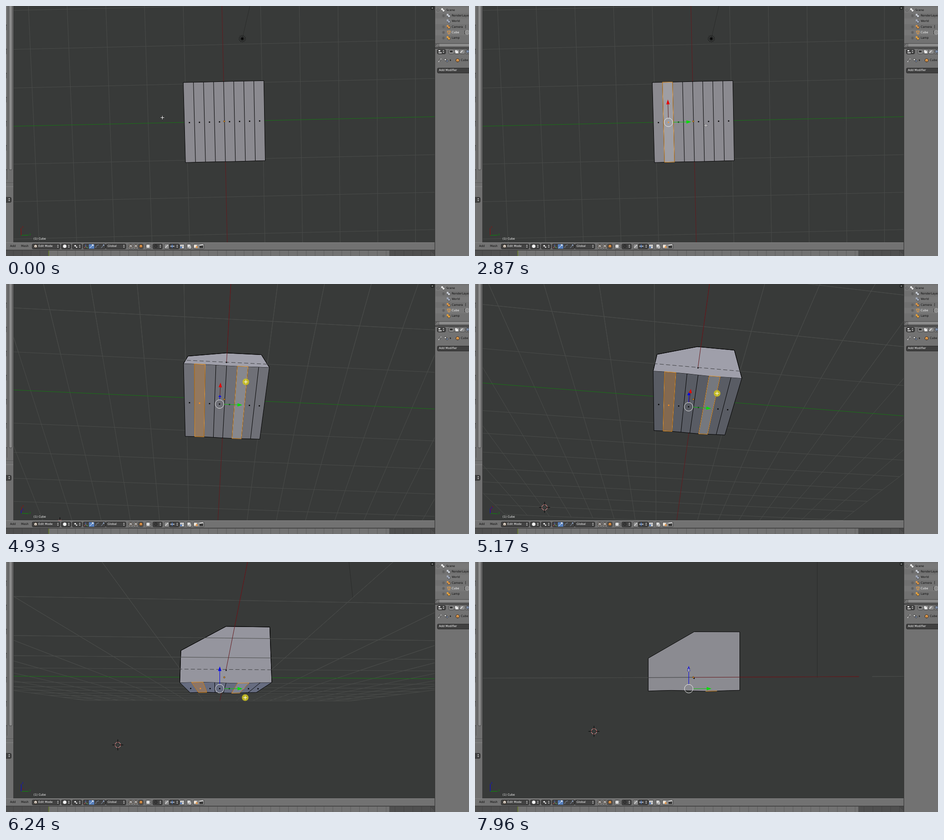
Animation, 1017 px wide and 550 px high, one loop 8 s. Source, as an HTML page with a canvas:

```html
<!DOCTYPE html>
<html lang="en">
<head>
<meta charset="utf-8">
<title>Box modelling viewport</title>
<style>
html, body { margin: 0; width: 100%; height: 100%; overflow: hidden; background: #727272; }
canvas { display: block; }
</style>
</head>
<body>
<canvas id="stage" width="1017" height="550"></canvas>
<script>
const ctx = document.getElementById('stage').getContext('2d');
const LOOP = 8000, STEP = 105, PHASE = 25;
const CX = 479.5, CY = 253.5, FOCAL = 506, DIST = 6.035, NEAR = 0.1;
const FONT = '6.3px "DejaVu Sans", sans-serif';
const ORANGE = '#f09a28', GRID = '#4a4c4a', RED = '#64191d', GREEN = '#187516';
const FIRST_PICK = 1290, SECOND_PICK = 3430, DRAG = 4540, RELEASE = 7530;

// time, x, y
const POINTER = [
  [0, 343, 245], [160, 383, 260], [640, 416, 270], [790, 419, 269], [1960, 420, 269],
  [2200, 426, 270], [2430, 450, 273], [2870, 508, 262], [3620, 509, 262], [3910, 512, 257],
  [4330, 522, 177], [7480, 506, 268], [7690, 506, 268], [7900, 469, 237]
];
// time, degrees below the floor, yaw
const ORBIT = [
  [4435, 88.45, -1.3], [5170, 48.8, 5.95], [5695, 20.8, 4], [6300, 8.5, 1.7],
  [6850, 3.65, 0.9], [7000, 1, 0.8], [7270, 0, 0.77]
];

const clamp = v => Math.min(1, Math.max(0, v));
const lerp = (a, b, u) => a + (b - a) * u;
const mix = (a, b, u) => `rgb(${a.map((v, i) => Math.round(lerp(v, b[i], clamp(u)))).join()})`;

function along(keys, t) {
  const i = Math.max(1, keys.findIndex(k => k[0] > t));
  if (t >= keys[keys.length - 1][0]) return keys[keys.length - 1].slice(1);
  const a = keys[i - 1], b = keys[i], u = clamp((t - a[0]) / (b[0] - a[0]));
  return [lerp(a[1], b[1], u), lerp(a[2], b[2], u)];
}

function line(x1, y1, x2, y2, color, width = 1) {
  ctx.strokeStyle = color;
  ctx.lineWidth = width;
  ctx.beginPath();
  ctx.moveTo(x1, y1);
  ctx.lineTo(x2, y2);
  ctx.stroke();
}
function rect(x, y, w, h, color) {
  ctx.fillStyle = color;
  ctx.fillRect(x, y, w, h);
}
function disc(x, y, r, fill, stroke, width = 1) {
  ctx.beginPath();
  ctx.arc(x, y, r, 0, Math.PI * 2);
  if (fill) { ctx.fillStyle = fill; ctx.fill(); }
  if (stroke) { ctx.strokeStyle = stroke; ctx.lineWidth = width; ctx.stroke(); }
}
function poly(points, fill, stroke) {
  ctx.beginPath();
  points.forEach(p => ctx.lineTo(p[0], p[1]));
  ctx.closePath();
  if (fill) { ctx.fillStyle = fill; ctx.fill(); }
  if (stroke) { ctx.strokeStyle = stroke; ctx.lineWidth = 1; ctx.stroke(); }
}
function dashed(pattern, paint) {
  ctx.setLineDash(pattern);
  paint();
  ctx.setLineDash([]);
}
function text(s, x, y, color = '#0a0a0a') {
  ctx.font = FONT;
  ctx.textBaseline = 'middle';
  ctx.fillStyle = color;
  ctx.fillText(s, x, y);
}
function button(x, y, w, h, fill = '#8b8b8b', border = '#454545') {
  ctx.beginPath();
  ctx.roundRect(x + 0.5, y + 0.5, w, h, 2.5);
  ctx.fillStyle = fill;
  ctx.fill();
  ctx.strokeStyle = border;
  ctx.lineWidth = 1;
  ctx.stroke();
}

const checker = (() => {
  const c = document.createElement('canvas');
  c.width = c.height = 2;
  const g = c.getContext('2d');
  g.fillStyle = 'rgba(255,255,255,.35)';
  g.fillRect(0, 0, 1, 1);
  g.fillRect(1, 1, 1, 1);
  return ctx.createPattern(c, 'repeat');
})();

// --- camera ---
let sinE, cosE, sinA, cosA;

function aim(e, a) {
  e *= Math.PI / 180;
  a *= Math.PI / 180;
  sinE = Math.sin(e); cosE = Math.cos(e);
  sinA = Math.sin(a); cosA = Math.cos(a);
}
function toView([x, y, z]) {
  const f = x * cosA - y * sinA;
  return [y * cosA + x * sinA, f * sinE + z * cosE, DIST - f * cosE + z * sinE];
}
const toScreen = ([r, u, d]) => [CX + FOCAL * r / d, CY - FOCAL * u / d, d];
const project = (x, y, z) => toScreen(toView([x, y, z]));

function line3(p, q, color) {
  let a = toView(p), b = toView(q);
  if (a[2] < b[2]) [a, b] = [b, a];
  if (a[2] < NEAR) return;
  if (b[2] < NEAR) {
    const u = (a[2] - NEAR) / (a[2] - b[2]);
    b = a.map((v, i) => lerp(v, b[i], u));
  }
  a = toScreen(a);
  b = toScreen(b);
  line(a[0], a[1], b[0], b[1], color);
}

// --- scene ---
function drawFloor(from) {
  for (let i = -8; i <= 8; i++) {
    if (!i) continue;
    line3([from, i, 0], [8, i, 0], GRID);
    if (i > from || from < 0) line3([i, -8, 0], [i, 8, 0], GRID);
  }
  if (from < 0) line3([0, -8, 0], [0, 8, 0], GREEN);
  else dashed([9, 5], () => line3([1, -1, 0], [1, 1, 0], '#3c3d40'));
  line3([from, 0, 0], [8, 0, 0], RED);
}

// the floor seen exactly edge-on
function drawHorizon() {
  line(17, 255, 380, 253.8, GRID);
  line(380, 253.8, 478, 253.2, '#3a3b3c');
  line(478, 253.3, 843, 251.6, RED);
  line(872, 251.4, 942, 251, GRID);
}

function drawLamp() {
  const lamp = [4.076, 1.005, 5.904];
  line3(lamp, [lamp[0], lamp[1], 0], '#2b2c2b');
  const [x, y, d] = project(...lamp);
  if (d < NEAR) return;
  disc(x, y, 2.6, '#000');
  disc(x, y, 4.2, null, '#111', 0.8);
  dashed([1.4, 2], () => disc(x, y, 7, null, '#0a0a0a', 1.2));
}

const stripY = i => -1 + i / 4;
const baseZ = i => -0.292 + 0.01 * Math.cos((i - 2) * Math.PI / 3);
const baseTone = e => e < 49
  ? mix([106, 112, 135], [89, 92, 100], e / 49)
  : mix([89, 92, 100], [139, 138, 144], (e - 49) / 39);

function drawBox(e, picked) {
  const ids = [...Array(9).keys()];
  const edge = x => ids.map(i => project(x, stripY(i), baseZ(i)));
  const near = edge(1), far = edge(-1);
  const quad = i => [near[i], near[i + 1], far[i + 1], far[i]];
  const active = picked[picked.length - 1];
  const baseShown = e > 2.8;

  if (baseShown) {
    poly([...near, ...far.slice().reverse()], baseTone(e), '#000');
    for (let i = 1; i < 8; i++) line(...near[i].slice(0, 2), ...far[i].slice(0, 2), '#000');
    picked.forEach(i => poly(quad(i), i === active ? checker : 'rgba(255,143,21,.25)'));
  }
  if (e < 80) {
    const top = [[1, 1], [0, 1], [-1, 0.42]].map(([y, z]) => project(1, y, z));
    poly([...near, ...top], mix([139, 139, 145], [159, 159, 170], e / 20));
    poly(baseShown ? [near[8], ...top, near[0], ...top.reverse()] : [...near, ...top], null, '#000');
    if (e > 0.3) drawFloor(1); else drawHorizon();
    const [x, y] = project(1, 0, -0.02);
    rect(x - 1.2, y - 1.2, 2.4, 2.4, '#000');
  }
  if (baseShown) {
    picked.forEach(i => poly(quad(i), null, ORANGE));
    for (let i = 0; i < 8 && e > 6; i++) {
      const [x, y] = project(0, stripY(i + 0.5), -0.295);
      rect(x - 1.3, y - 1.3, 2.6, 2.6, picked.includes(i) ? '#ff9320' : '#000');
    }
  } else if (picked.length) {
    line(...near[active].slice(0, 2), ...near[active + 1].slice(0, 2), ORANGE);
  }
  disc(CX - 0.5, CY - 0.3, 1.7, ORANGE, '#3a2a10', 0.8);
}

function drawGizmo(picked) {
  if (!picked.length) return;
  const mid = picked.reduce((s, i) => s + stripY(i + 0.5), 0) / picked.length;
  const p = [0, mid, -0.295], [x, y, d] = project(...p);
  const size = 50 * d / FOCAL;
  [['#e80000', '#5a1c1c'], ['#00e000', '#0fc40f'], ['#0000ee', '#0000ee']].forEach(([head, shaft], axis) => {
    const at = k => project(...p.map((v, i) => v + (i === axis ? size * k : 0)));
    const tip = at(1), neck = at(0.79);
    const dx = tip[0] - x, dy = tip[1] - y, len = Math.hypot(dx, dy);
    if (len < 8) return;
    const ux = dx / len, uy = dy / len, w = 3.6;
    if (len > 11) line(x + ux * 10, y + uy * 10, neck[0], neck[1], shaft);
    poly([tip, [neck[0] - uy * w, neck[1] + ux * w], [neck[0] + uy * w, neck[1] - ux * w]], head);
  });
  disc(x, y, 9.4, null, '#f0f0f0');
}

function drawAnchor() {
  const [x, y, d] = project(-2.324, -3.56, -1.948);
  if (d < NEAR) return;
  disc(x, y, 6, null, '#eee');
  dashed([2.4, 2.4], () => disc(x, y, 6, null, '#d02020'));
  for (const s of [-1, 1]) {
    line(x + s * 4, y, x + s * 12, y, '#000');
    line(x, y + s * 4, x, y + s * 12, '#000');
  }
}

function drawAxes() {
  const ox = 33, oy = 504, len = 16;
  ['#8c1212', '#0c8a0c', '#0a0ad8'].forEach((color, axis) => {
    const [r, u] = toView([0, 1, 2].map(i => +(i === axis)));
    if (Math.hypot(r, u) < 0.12) return;
    const x = ox + r * len, y = oy - u * len;
    line(ox, oy, x, y, color, 1.2);
    text('xyz'[axis], x + 1.5, y - 2, color);
  });
}

function drawPointer(x, y, pressed) {
  if (pressed) disc(x, y, 7.3, 'rgba(205,195,30,.88)');
  const cross = (color, width, r) => {
    line(x - r, y, x + r, y, color, width);
    line(x, y - r, x, y + r, color, width);
  };
  if (!pressed) cross('rgba(0,0,0,.45)', 2.6, 4.4);
  cross('#fff', 1.1, 4);
}

// --- interface ---
function arrows(x, y) {
  for (const s of [-1, 1]) poly([[x - 1.6, y + s], [x, y + s * 3.4], [x + 1.6, y + s]], '#ddd');
}
function dropdown(x, y, w, h = 11) {
  button(x, y - h / 2, w, h, '#424242', '#2a2a2a');
  arrows(x + w - 4, y);
}
function cube(x, y, color) {
  const hex = [...Array(6).keys()].map(i => [x + 4 * Math.sin(i * Math.PI / 3), y - 4 * Math.cos(i * Math.PI / 3)]);
  poly(hex, color, '#33261a');
  line(x, y, x, y + 3.5, '#33261a', 0.7);
}
function grip(x, y) {
  for (let i = 0; i < 3; i++) line(x + i * 3, y, x + 9, y + 9 - i * 3, '#333', 0.8);
}

function drawLeft() {
  rect(0, 0, 17, 520, '#707070');
  button(6, -8, 7, 368, '#8b8b8b', '#484848');
  for (let y = 0; y < 370; y += 53) {
    rect(0, y, 1.5, 42, '#8b8b8b');
    line(0, y + 42, 2, y + 42, '#333');
  }
  line(2.5, 0, 2.5, 382, '#555');
  line(0, 388.5, 16, 388.5, '#5a5a5a');
  line(0, 397.5, 16, 397.5, '#858585');
  dropdown(-4, 426, 15);
  line(16.5, 0, 16.5, 520, '#3a3a3a');
}

function drawHeader() {
  const y = 528.5, top = 523, h = 11;
  rect(0, 520, 942, 17, '#727272');
  line(0, 520.5, 942, 520.5, '#858585');
  text('Add', 9, y);
  text('Mesh', 33, y);

  dropdown(57, y, 61);
  cube(65, y, '#d8d0c8');
  text('Edit Mode', 71, y, '#fff');
  dropdown(121, y, 21);
  disc(129, y, 3.8, '#f2f2f2');
  dropdown(145, y, 21);
  disc(152, y - 1, 2.6, '#ddd', '#222');
  disc(155, y + 2, 1.6, '#ddd');

  button(169, top, 49, h, '#424242', '#2a2a2a');
  line(175, y + 1, 175, y - 4, '#5a7be0');
  line(175, y + 1, 171, y + 4, '#d05050');
  line(175, y + 1, 180, y + 4, '#60c060');
  rect(182, top + 1, 12, h - 1, '#5780bd');
  line(184, y + 4, 191, y - 3, '#fff');
  poly([[192, y - 4], [192, y], [188, y - 4]], '#fff');
  ctx.beginPath();
  ctx.arc(204, y + 4, 7, Math.PI, Math.PI * 1.5);
  ctx.strokeStyle = '#8a9cb8';
  ctx.stroke();
  line(209, y + 4, 215, y - 3, '#8a9cb8');
  rect(213, y - 4, 3, 3, '#8a9cb8');
  dropdown(219, y, 44);
  text('Global', 223, y, '#fff');

  for (let i = 0; i < 3; i++) {
    button(268 + i * 11, top, 11, h, i < 2 ? '#8b8b8b' : '#555');
    cube(274 + i * 11.2, y, i < 2 ? '#aaa' : '#e0954a');
  }
  button(306, top, 12, h);
  dashed([1.5, 1.5], () => disc(312, y, 4, '#ddd', '#111'));
  dropdown(322, y, 21);
  disc(329, y, 3.2, '#3a3a3a', '#222');
  button(347, top, 11, h);
  line(350, y + 3, 356, y - 3, '#ccc', 2);
  dropdown(358, y, 22);
  line(361, y, 370, y, '#e8f0ff', 1.4);
  line(365, y - 4, 365, y + 4, '#4a80d8', 1.4);
  button(381, top, 11, h);
  for (let i = 0; i < 4; i++) rect(383 + i % 2 * 4, y - 3 + (i >> 1) * 4, 3, 3, i === 2 ? '#4a80d8' : '#e8e8e8');
  button(396, top, 11, h);
  rect(399, y - 3.5, 5, 5, '#ddd');
  disc(404, y + 2, 2.4, '#999', '#eee');
  button(411, top, 24, h);
  rect(413, y - 3, 6, 6, '#efe6da');
  disc(419, y + 2, 2.2, '#e0954a');
  rect(425, y - 1, 8, 5, '#333');
  line(425, y - 2, 433, y - 4, '#eee', 1.5);
}

function drawTimeline() {
  rect(0, 537, 942, 13, '#4f4f4f');
  rect(94, 538, 748, 12, '#727272');
  for (let x = 16; x < 942; x += 19.5) line(x, 538, x, 550, 'rgba(40,40,40,.28)');
  line(0, 537, 942, 537, '#2e2e2e');
  line(94, 538, 94, 550, '#6f8a2a', 1.4);
  grip(932, 537);
}

function drawOutliner() {
  const icons = ['#e8e8e8', '#c8ccd4', '#a0a8b8', '#d8954a', '#e89a3c', '#e0a040'];
  ['Scene', 'RenderLayers', 'World', 'Camera', 'Cube', 'Lamp'].forEach((name, i) => {
    const y = 9 + i * 12.3, x = i ? 979 : 967, knob = x - 18, lit = name === 'Cube';
    if (i % 2 === 0) rect(943, y - 6, 74, 12.3, '#787878');
    if (name !== 'World') {
      disc(knob, y, 2.3, '#b4b4b4', '#333', 0.8);
      line(knob - 1.4, y, knob + 1.4, y, '#111', 0.8);
      if (i) line(knob, y - 1.4, knob, y + 1.4, '#111', 0.8);
    }
    if (lit) {
      disc(x - 6, y, 5, '#8a8178');
      poly([[x - 10, y - 3], [x - 3, y - 3], [x - 6, y + 4]], null, icons[i]);
    } else {
      disc(x - 6, y + 1, 3, icons[i], '#333', 0.8);
      rect(x - 11, y - 4, 4, 4, icons[i]);
    }
    text(name, x, y, lit ? '#fff' : '#0a0a0a');
  });
  line(1009.5, 42, 1009.5, 49, '#333');
  line(1007.5, 54, 1007.5, 62, '#333');
  disc(1013, 58, 4.5, '#8c8c8c', '#aaa');
}

function drawRight() {
  rect(942, 0, 75, 550, '#727272');
  drawOutliner();
  button(944, 82, 90, 7, '#8c8c8c', '#484848');
  grip(943, 82);
  line(942, 92.5, 1017, 92.5, '#2e2e2e', 2);
  dropdown(947, 100, 18, 10);
  rect(950, 97, 4, 3, '#ddd');
  rect(950, 102, 7, 2, '#ddd');
  for (let x = 972; x < 1017; x += 12) button(x, 95, 12, 10);
  rect(975, 98, 6, 4, '#333');
  rect(986, 97, 5, 5, '#ccc');
  rect(988, 99, 5, 5, '#eee');
  line(998, 103, 1003, 98, '#eee', 1.6);
  disc(1014, 100, 3.5, '#7d8ca5', '#333');

  line(950, 123, 956, 116, '#ddd', 1.5);
  disc(953, 119, 1.8, '#bbb', '#333');
  disc(965, 118, 2.3, '#ddd', '#333');
  disc(969, 121, 2, '#8aa0c8', '#333');
  poly([[975, 117], [978, 119.2], [975, 121.5]], '#222');
  cube(992, 119.5, '#e8a050');
  text('Cube', 999, 119.5);
  button(947, 136, 90, 11, '#404040', '#2a2a2a');
  text('Add Modifier', 951, 141.5, '#fff');
  line(942, 0, 942, 550, '#2a2a2a');
}

function drawViewport(e, yaw, picked) {
  ctx.save();
  ctx.beginPath();
  ctx.rect(17, 0, 925, 520);
  ctx.clip();
  rect(17, 0, 925, 520, '#383a39');
  ctx.translate(0.5, 0.5);
  aim(e, yaw);
  if (e > 0.3) drawFloor(-8); else drawHorizon();
  drawLamp();
  drawBox(e, picked);
  drawAnchor();
  drawGizmo(picked);
  drawAxes();
  text('(1) Cube', 60, 512, '#fff');
  disc(936, 4, 4, '#222423');
  line(934, 4, 938, 4, '#999');
  line(936, 2, 936, 6, '#999');
  ctx.restore();
}

function draw(t) {
  const step = PHASE + STEP * Math.floor((t - PHASE) / STEP);
  const [e, yaw] = along(ORBIT, step);
  const picked = t < FIRST_PICK ? [] : t < SECOND_PICK ? [1] : [1, 5];
  const dragging = t >= DRAG && t < RELEASE;
  const pressed = dragging || (t >= FIRST_PICK - 100 && t < 1510) || (t >= SECOND_PICK && t < 3620);
  const [x, y] = dragging ? [519.5 + (yaw + 1.36) / 0.62, 313 - e / 0.67] : along(POINTER, step);

  drawViewport(e, yaw, picked);
  drawLeft();
  drawHeader();
  drawTimeline();
  drawRight();
  drawPointer(x + 0.5, y + 0.5, pressed);
}

const start = performance.now();
function tick() {
  draw((performance.now() - start) % LOOP);
  requestAnimationFrame(tick);
}
tick();
</script>
</body>
</html>
```
